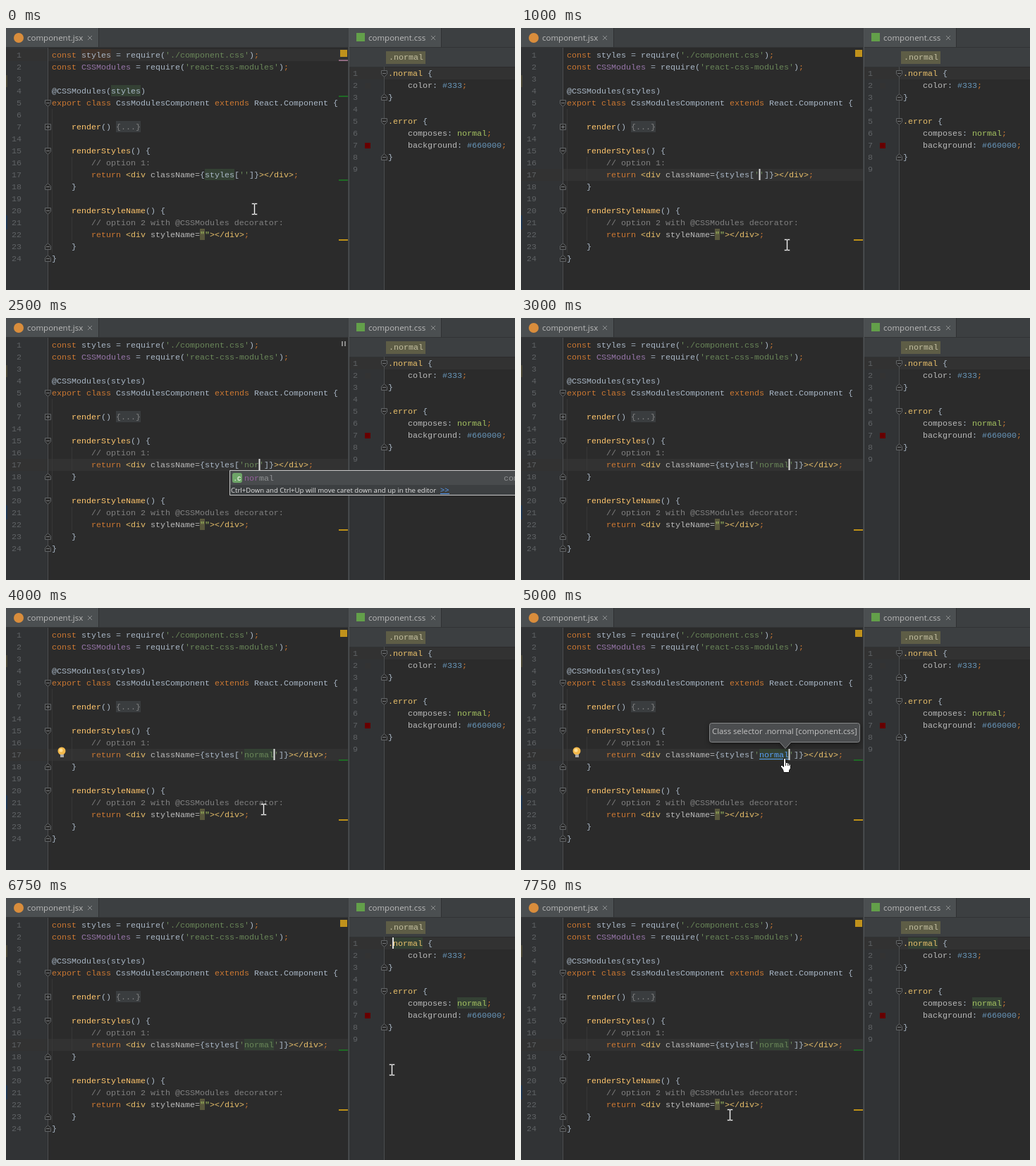
These frames come from a looping animation (722 px wide and 372 px high, 8 s). An HTML page with a canvas:

```html
<!DOCTYPE html>
<html lang="en">
<head>
<meta charset="utf-8">
<title>Editor completion</title>
<style>
html, body { margin: 0; width: 100%; height: 100%; overflow: hidden; background: #2b2b2b; }
canvas { display: block; }
</style>
</head>
<body>
<canvas id="stage" width="722" height="372"></canvas>
<script>
const ctx = document.getElementById('stage').getContext('2d');
const LOOP = 8000, STEP = 250, CH = 7, ROW = 17;
const MONO = '11.665px "Liberation Mono", monospace';
const ui = size => size + 'px "Open Sans", "Noto Sans", sans-serif';
const C = {
  bg: '#2b2b2b', gutter: '#313335', bar: '#3c3f41', tab: '#4b4f51', row: '#323232',
  text: '#a9b7c6', key: '#cc7832', str: '#6a8759', fn: '#ffc66d', tag: '#e8bf6a',
  attr: '#bababa', val: '#a5c261', num: '#6897bb', gray: '#808080', purple: '#9876aa',
  lineNo: '#606366', fold: '#626567', hit: '#344134', write: '#40332b', link: '#589df6'
};

// Time-stamped values: the last entry at or before t applies.
const at = (list, t) => list.reduce((v, e) => (t >= e[0] ? e[1] : v), null);
const between = (t, a, b) => t >= a && t < b;

const mouseTrack = [
  [0, [352, 257]], [250, [349, 217]], [500, [349, 211]], [750, [356, 279]], [1000, [377, 308]],
  [2000, null], [4000, [365, 286]], [4250, [370, 268]], [4500, [376, 239]], [4750, [375, 222]],
  [6000, [472, 238]], [6250, [544, 242]], [6500, [547, 244]], [7250, [487, 241]],
  [7500, [390, 280]], [7750, [296, 308]]
];
const typedTrack = [[0, ''], [2000, 'n'], [2250, 'no'], [2500, 'nor'], [3000, 'normal']];
const leftCaret = [[0, 0], [750, 1], [1750, 0], [2000, 1], [4250, 0], [4750, 1], [5750, 0]];
const rightCaret = [[0, 0], [5750, 1], [6250, 0], [6750, 1], [7250, 0], [7500, 1], [7750, 0]];
const status = [[0, 'warn'], [2000, ''], [2250, 'pause'], [3000, ''], [3500, 'warn']];

function box(x, y, w, h, color) {
  ctx.fillStyle = color;
  ctx.fillRect(x, y, w, h);
}

function path(points, color, close) {
  ctx.beginPath();
  points.forEach(([x, y]) => ctx.lineTo(x, y));
  if (close) ctx.closePath();
  ctx.strokeStyle = color;
  ctx.lineWidth = 1;
  ctx.stroke();
}

function disc(x, y, r, color) {
  ctx.fillStyle = color;
  ctx.beginPath();
  ctx.arc(x, y, r, 0, Math.PI * 2);
  ctx.fill();
}

function label(str, x, y, color, font = MONO, align = 'left') {
  ctx.font = font;
  ctx.textAlign = align;
  ctx.fillStyle = color;
  ctx.fillText(str, x, y + 4);
}

// Alternating text and colour key.
function code(x, y, ...parts) {
  for (let i = 0; i < parts.length; i += 2) {
    label(parts[i], x, y, C[parts[i + 1]]);
    x += parts[i].length * CH;
  }
}

const leftY = i => 38 + ROW * i;
const rightY = i => 64 + ROW * i;
const mark = (x, y, n, color = C.hit) => box(x, y - 8, n * CH, 16, color);
const caret = (x, y) => box(x, y - 8, 2, 16, '#dddddd');

function foldMark(x, y, kind) {
  const shape = kind === 'plus'
    ? [[-4, -4], [4, -4], [4, 4], [-4, 4]]
    : [[-4, -4], [4, -4], [4, 1], [0, 5], [-4, 1]].map(([a, b]) => [a, kind === 'end' ? -b : b]);
  const pts = shape.map(([a, b]) => [x + a + .5, y + b + .5]);
  ctx.beginPath();
  pts.forEach(p => ctx.lineTo(...p));
  ctx.fillStyle = C.bg;
  ctx.fill();
  path(pts, C.fold, true);
  path([[x - 2, y + .5], [x + 3, y + .5]], '#77797b');
  if (kind === 'plus') path([[x + .5, y - 2], [x + .5, y + 3]], '#77797b');
}

function tab(x, w, name, nameX, closeX) {
  box(x, 0, w, 28, C.tab);
  box(x + w, 0, 1, 28, '#2f3133');
  label(name, nameX, 13.5, '#bbbbbb', ui(11.5));
  path([[closeX - 3, 11], [closeX + 3, 17]], '#8d8f90');
  path([[closeX + 3, 11], [closeX - 3, 17]], '#8d8f90');
}

function drawLeft(t) {
  const typed = at(typedTrack, t);
  const first = t < 750, stylesHit = t < 1000;
  const y17 = leftY(10);
  box(0, 28, 486, 344, C.bg);
  box(0, 28, 59, 344, C.gutter);
  box(0, (first ? leftY(0) : y17) - 8, 486, ROW, C.row);
  box(0, 67, 2, 17, '#4a4636');
  box(0, 266, 2, 20, '#1d3550');
  box(59, 28, 1, 344, '#4b4d4f');

  box(65, 115, 1, 204, '#373737');
  box(93, 183, 1, 34, '#373737');
  box(93, 268, 1, 34, '#373737');

  for (let i = 0; i < 18; i++) {
    label(String(i < 7 ? i + 1 : i + 7), 22, leftY(i), C.lineNo, MONO, 'right');
  }
  [[4, 'start'], [6, 'plus'], [8, 'start'], [11, 'end'], [13, 'start'], [16, 'end'], [17, 'end']]
    .forEach(([i, kind]) => foldMark(59, leftY(i), kind));

  if (stylesHit) {
    mark(107, leftY(0), 6, C.write);
    mark(149, leftY(3), 6);
    mark(282, y17, 6);
  }
  if (t >= 3500) mark(338, y17, 6);
  mark(275, leftY(15), 1, '#58573c');
  box(156, leftY(6) - 8, 35, 16, '#3a3d3f');

  code(65, leftY(0), 'const ', 'key', 'styles = require(', 'text', "'./component.css'", 'str', ')', 'text', ';', 'key');
  code(65, leftY(1), 'const ', 'key', 'CSSModules', 'purple', ' = require(', 'text', "'react-css-modules'", 'str', ')', 'text', ';', 'key');
  code(65, leftY(3), '@CSSModules(styles)', 'text');
  code(65, leftY(4), 'export class ', 'key', 'CssModulesComponent ', 'text', 'extends ', 'key', 'React.Component {', 'text');
  code(93, leftY(6), 'render', 'fn', '() ', 'text', '{...}', 'gray');
  code(93, leftY(8), 'renderStyles', 'fn', '() {', 'text');
  code(121, leftY(9), '// option 1:', 'gray');
  const linked = between(t, 4750, 5750);
  code(121, y17, 'return ', 'key', '<div ', 'tag', 'className=', 'attr', '{styles[', 'text', "'", 'str',
    typed, linked ? 'link' : 'str', "'", 'str', ']}', 'text', '></div>', 'tag', ';', 'key');
  if (linked) box(338, y17 + 6, 42, 1, C.link);
  code(93, leftY(11), '}', 'text');
  code(93, leftY(13), 'renderStyleName', 'fn', '() {', 'text');
  code(121, leftY(14), '// option 2 with @CSSModules decorator:', 'gray');
  code(121, leftY(15), 'return ', 'key', '<div ', 'tag', 'styleName=', 'attr', '""', 'val', '></div>', 'tag', ';', 'key');
  code(93, leftY(16), '}', 'text');
  code(65, leftY(17), '}', 'text');

  if (at(leftCaret, t)) caret(337.5 + typed.length * CH, y17);
  if (between(t, 1500, 2000) || between(t, 4000, 5750)) bulb(79, 203);

  if (stylesHit) {
    box(472, 45, 14, 2, '#8f6a80');
    box(472, 96, 14, 2, '#1f6b25');
  }
  if (stylesHit || t >= 3500) box(472, 215, 14, 2, '#1f6b25');
  box(472, 300, 14, 2, '#be9117');
  const state = at(status, t);
  if (state === 'warn') box(474, 31, 10, 10, '#c0921c');
  if (state === 'pause') {
    box(476, 33, 2, 7, '#8a8a8a');
    box(480, 33, 2, 7, '#8a8a8a');
  }
}

function bulb(x, y) {
  disc(x, y, 5.5, '#f2b84b');
  disc(x - 1, y - 1, 2.5, '#ffdf95');
  box(x - 2, y + 5, 5, 4, '#a9a9a9');
}

function drawRight(t) {
  box(486, 28, 236, 344, C.bg);
  box(486, 28, 236, 27, C.bar);
  box(539, 33, 56, 18, '#5e5d46');
  label('.normal', 543, 41, '#c3bfa0');
  box(487, 55, 49, 317, C.gutter);
  box(487, 56, 235, ROW, C.row);
  box(536, 55, 1, 317, '#4b4d4f');
  for (let i = 0; i < 9; i++) label(String(i + 1), 499, rightY(i), C.lineNo, MONO, 'right');
  [[0, 'start'], [2, 'end'], [4, 'start'], [7, 'end']]
    .forEach(([i, kind]) => foldMark(536, rightY(i), kind));
  box(509, 78, 8, 8, '#333333');
  box(509, 163, 8, 8, '#660000');

  if (t >= 6250) {
    mark(549, rightY(0), 6);
    mark(640, rightY(5), 6);
  }
  code(542, rightY(0), '.normal ', 'tag', '{', 'text');
  code(570, rightY(1), 'color', 'attr', ': ', 'text', '#333', 'num', ';', 'key');
  code(542, rightY(2), '}', 'text');
  code(542, rightY(4), '.error ', 'tag', '{', 'text');
  code(570, rightY(5), 'composes', 'attr', ': ', 'text', 'normal', 'val', ';', 'key');
  code(570, rightY(6), 'background', 'attr', ': ', 'text', '#660000', 'num', ';', 'key');
  code(542, rightY(7), '}', 'text');
  if (at(rightCaret, t)) caret(548, rightY(0));
}

function drawTabs() {
  box(0, 0, 722, 28, C.bar);
  tab(0, 131, 'component.jsx', 30, 119);
  tab(487, 130, 'component.css', 514, 606);
  disc(18, 14, 7, '#d98d3c');
  box(497, 7, 12, 12, '#63a04a');
  box(0, 27, 722, 1, '#323435');
  box(485, 0, 2, 372, '#3c3f41');
  box(486, 0, 1, 372, '#4f5254');
}

function drawPopup(typed) {
  box(317, 216, 420, 36, '#3c3f41');
  box(318, 217, 404, 20, '#484b4d');
  path([[722, 216.5], [317.5, 216.5], [317.5, 251.5], [722, 251.5]], '#c8c8c8');
  ctx.fillStyle = '#6ea568';
  ctx.beginPath();
  ctx.roundRect(321, 220, 14, 14, 3);
  ctx.fill();
  label('.C', 328, 227, '#e4efdf', 'bold 9px "Liberation Mono", monospace', 'center');
  label(typed, 338, 227, '#94609c');
  label('normal'.slice(typed.length), 338 + typed.length * CH, 227, '#8f9193');
  label('component.css', 706, 227, '#8f9193');
  label('Ctrl+Down and Ctrl+Up will move caret down and up in the editor', 319, 243.5, '#e0e0e0', ui(9.6));
  label('>>', 616, 243.5, C.link, ui(11));
  box(616, 249, 13, 1, C.link);
}

function drawTooltip() {
  ctx.save();
  ctx.shadowColor = 'rgba(0,0,0,.5)';
  ctx.shadowBlur = 6;
  ctx.shadowOffsetY = 2;
  ctx.beginPath();
  ctx.moveTo(270.5, 163.5);
  ctx.arcTo(480.5, 163.5, 480.5, 190.5, 3);
  ctx.arcTo(480.5, 190.5, 384, 190.5, 3);
  ctx.lineTo(383, 190.5);
  ctx.lineTo(375, 199.5);
  ctx.lineTo(367, 190.5);
  ctx.arcTo(267.5, 190.5, 267.5, 163.5, 3);
  ctx.arcTo(267.5, 163.5, 280, 163.5, 3);
  ctx.closePath();
  ctx.fillStyle = '#4b4d4f';
  ctx.fill();
  ctx.restore();
  ctx.strokeStyle = '#858788';
  ctx.lineWidth = 1;
  ctx.stroke();
  label('Class selector .normal [component.css]', 271, 174.5, '#c4c4c4', ui(11.3));
}

function beam(x, y) {
  const parts = [[x - 3, y - 8, 3, 1], [x + 1, y - 8, 3, 1], [x, y - 7, 1, 14], [x - 3, y + 7, 3, 1], [x + 1, y + 7, 3, 1]];
  parts.forEach(([a, b, w, h]) => box(a - .5, b - .5, w + 1, h + 1, 'rgba(255,255,255,.35)'));
  parts.forEach(([a, b, w, h]) => box(a, b, w, h, '#f6f6f6'));
}

function hand(x, y) {
  const outline = [[-3, -9], [-1, -9], [0, -8], [0, -3], [3, -3], [6, -1], [7, 1], [7, 5], [5, 8], [5, 11],
    [-3, 11], [-4, 7], [-7, 3], [-7, 1], [-5, 1], [-3, 3]];
  const pts = outline.map(([a, b]) => [x + a + .5, y + b + .5]);
  ctx.beginPath();
  pts.forEach(p => ctx.lineTo(...p));
  ctx.fillStyle = '#ffffff';
  ctx.fill();
  path(pts, '#111111', true);
  [0, 3, 5].forEach(a => path([[x + a + .5, y - 2], [x + a + .5, y + 2]], '#333333'));
}

function render(t) {
  ctx.clearRect(0, 0, 722, 372);
  drawLeft(t);
  drawRight(t);
  drawTabs();
  if (between(t, 2250, 3000)) drawPopup(at(typedTrack, t));
  if (between(t, 5000, 5750)) drawTooltip();
  const mouse = at(mouseTrack, t);
  if (mouse) (between(t, 4750, 5750) ? hand : beam)(...mouse);
}

const start = performance.now();
function frame() {
  const t = (performance.now() - start) % LOOP;
  render(Math.floor(t / STEP) * STEP);
  requestAnimationFrame(frame);
}
frame();
</script>
</body>
</html>
```
